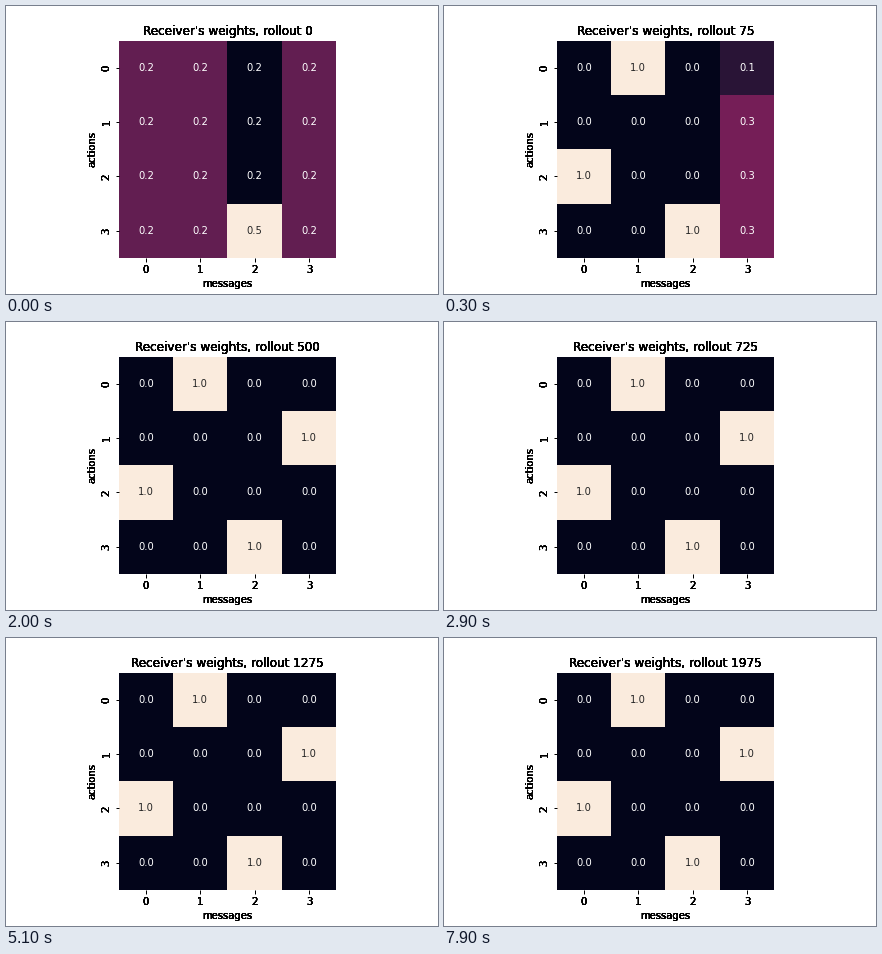
Write a matplotlib script that moves like this. It is 432 px wide and 288 px high and loops after 8 s.

```python
import matplotlib.pyplot as plt
import numpy as np
from matplotlib.animation import FuncAnimation
from matplotlib.colors import LinearSegmentedColormap, Normalize

FRAMES, INTERVAL, STEP = 80, 100, 25
N = 4
ROCKET = LinearSegmentedColormap.from_list("rocket", [
    "#03051a", "#35193e", "#701f57", "#ad1759",
    "#e13342", "#f37651", "#f6b48f", "#faebdd"])

plt.rcParams.update({
    "font.family": "DejaVu Sans", "font.size": 10,
    "xtick.major.width": 1, "ytick.major.width": 1,
})


def one_hot(action):
    return np.eye(N)[action]


EVEN = np.full(N, 0.25)
# Action probabilities of each message; the last entry of a list persists.
COLUMNS = [
    [EVEN, [0.15, 0.15, 0.55, 0.15], one_hot(2)],
    [EVEN, [0.76, 0.08, 0.08, 0.08], one_hot(0)],
    [[1 / 6, 1 / 6, 1 / 6, 1 / 2], one_hot(3)],
    [EVEN, EVEN, [0.19, 0.27, 0.27, 0.27], [0.11, 0.297, 0.297, 0.297],
     [0, 0.6, 0.2, 0.2], [0, 0.88, 0.06, 0.06], one_hot(1)],
]


def weights(i):
    return np.column_stack([c[min(i, len(c) - 1)] for c in COLUMNS])


def text_color(rgba):
    """White on dark cells, dark grey on light ones."""
    rgb = np.asarray(rgba[:3])
    linear = np.where(rgb <= 0.03928, rgb / 12.92,
                      ((rgb + 0.055) / 1.055) ** 2.4)
    return ".15" if linear @ [0.2126, 0.7152, 0.0722] > 0.408 else "w"


def harden(text, passes=8):
    """Draw repeatedly so the antialiased edges turn solid."""
    draw = text.draw

    def draw_solid(renderer):
        for _ in range(passes):
            draw(renderer)

    text.draw = draw_solid


fig, ax = plt.subplots(figsize=(6, 4), dpi=72, facecolor="white")
fig.subplots_adjust(left=0.125, right=0.9, bottom=0.125, top=0.88)
ax.set_aspect("equal")
mesh = ax.pcolormesh(weights(0), cmap=ROCKET)
ax.set(xlim=(0, N), ylim=(N, 0), xlabel="messages", ylabel="actions")
ax.spines[:].set_visible(False)

centers = np.arange(N) + 0.5
ax.set_xticks(centers, range(N))
ax.set_yticks(centers, range(N), rotation=90, va="center")
title = ax.set_title("", fontsize=12)
cells = [[ax.text(x, y, "", ha="center", va="center") for x in centers]
         for y in centers]

for label in (title, ax.xaxis.label, ax.yaxis.label,
              *ax.get_xticklabels(), *ax.get_yticklabels()):
    harden(label)


def update(i):
    w = weights(i)
    norm = Normalize(w.min(), w.max())
    mesh.set_norm(norm)
    mesh.set_array(w)
    for r in range(N):
        for c in range(N):
            cells[r][c].set_text(f"{w[r, c]:.1f}")
            cells[r][c].set_color(text_color(ROCKET(norm(w[r, c]))))
    title.set_text(f"Receiver's weights, rollout {i * STEP}")


anim = FuncAnimation(fig, update, frames=FRAMES, interval=INTERVAL,
                     init_func=lambda: update(0), repeat=True,
                     repeat_delay=0)
plt.show()
```
